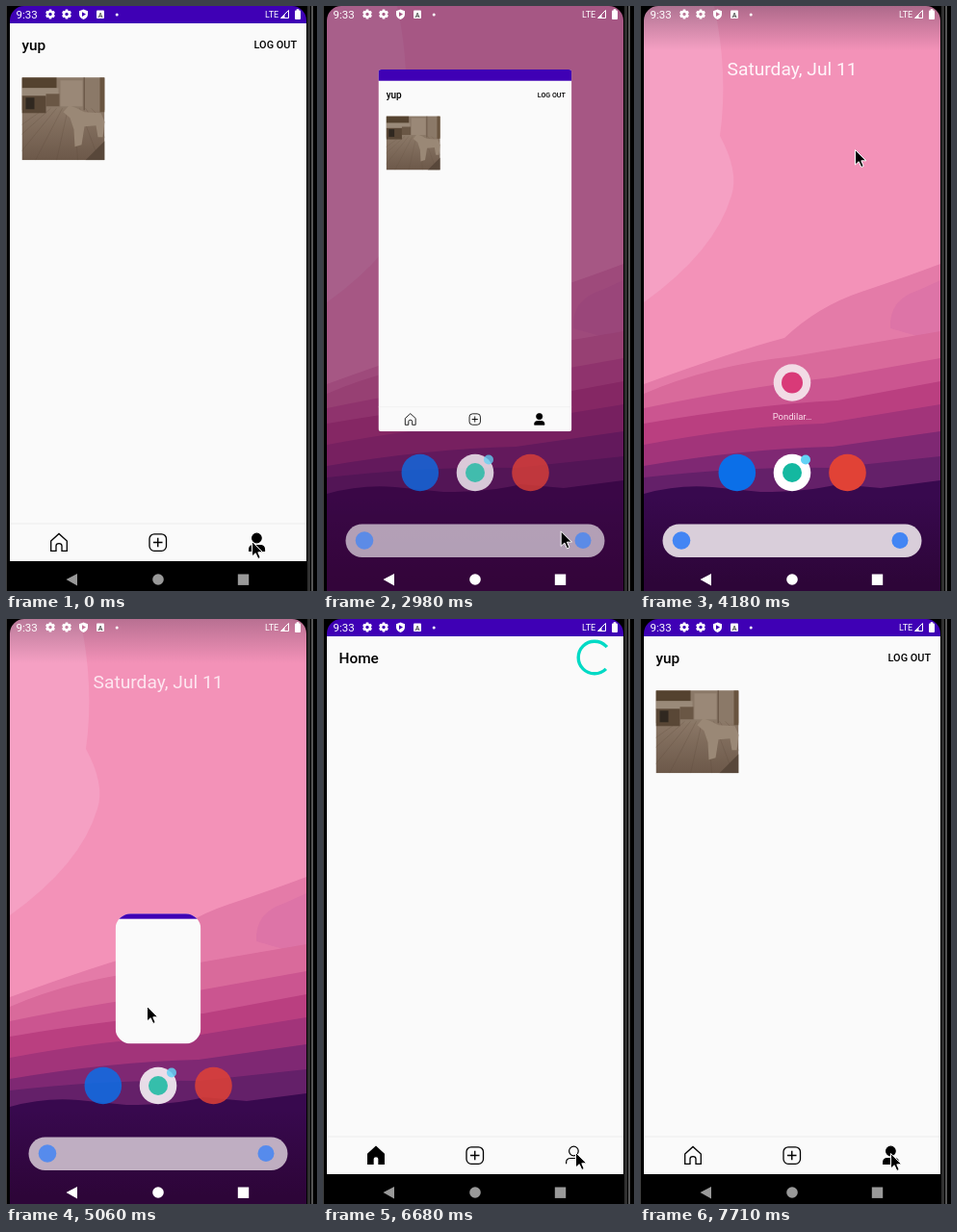
An HTML page with a canvas that plays this animation: 323 by 608 pixels, repeating every 8 s.

```html
<!DOCTYPE html>
<html lang="en">
<head>
<meta charset="utf-8">
<title>Phone screen</title>
<style>
html, body { margin: 0; width: 100%; height: 100%; overflow: hidden; background: #000; }
canvas { display: block; width: 323px; height: 608px; }
</style>
</head>
<body>
<canvas id="stage" width="323" height="608"></canvas>
<script>
const ctx = document.getElementById('stage').getContext('2d');
const LOOP = 8000;
const APP_LEAVES = 2640, APP_OPENS = 5030, APP_FULL = 5510;
const NAV_SHOWN = 5960, HOME_SHOWN = 6240, PROFILE_SHOWN = 7410;

// time, x, y of the pointer tip
const pointerPath = [
  [0, 255, 556], [150, 255, 556], [600, 41, 74], [900, 41, 74], [1150, 33, 44],
  [1340, 32, 50], [1640, 32, 50], [2060, 252, 591], [2750, 252, 591],
  [3560, 225, 360], [3680, 226, 340], [3880, 235, 65], [4180, 223, 149],
  [4770, 146, 402], [5800, 146, 402], [6400, 250, 583], [6650, 262, 554],
  [7270, 262, 554], [7410, 260, 555], [8000, 260, 555]
];

const ramp = (t, from, to) => Math.min(1, Math.max(0, (t - from) / (to - from)));
const mix = (a, b, p) => a + (b - a) * p;
const easeOut = p => 1 - (1 - p) ** 3;
const smooth = p => p * p * (3 - 2 * p);

function rect(x, y, w, h, color) {
  ctx.fillStyle = color;
  ctx.fillRect(x, y, w, h);
}

function round(x, y, w, h, r, color) {
  ctx.fillStyle = color;
  ctx.beginPath();
  ctx.roundRect(x, y, w, h, r);
  ctx.fill();
}

function disc(x, y, r, color) {
  ctx.fillStyle = color;
  ctx.beginPath();
  ctx.arc(x, y, r, 0, 7);
  ctx.fill();
}

function shape(d, fill, stroke, width = 1.3) {
  const path = new Path2D(d);
  if (fill) { ctx.fillStyle = fill; ctx.fill(path); }
  if (stroke) { ctx.strokeStyle = stroke; ctx.lineWidth = width; ctx.stroke(path); }
}

function label(text, x, y, size, color, weight = 400, align = 'left') {
  ctx.font = `${weight} ${size}px Roboto, sans-serif`;
  ctx.textAlign = align;
  ctx.fillStyle = color;
  ctx.fillText(text, x, y);
}

function scoped(draw) {
  ctx.save();
  draw();
  ctx.restore();
}

function gear(x, y) {
  scoped(() => {
    ctx.translate(x, y);
    ctx.fillStyle = ctx.strokeStyle = '#fff';
    for (let i = 0; i < 6; i++) {
      ctx.rotate(Math.PI / 3);
      ctx.fillRect(-1.3, -5, 2.6, 3);
    }
    ctx.lineWidth = 2.2;
    ctx.beginPath();
    ctx.arc(0, 0, 2.8, 0, 7);
    ctx.stroke();
  });
}

function statusIcons() {
  label('9:33', 10.5, 13, 11.5, '#fff');
  gear(46, 8.5);
  gear(63, 8.5);
  shape('M80.5 3.5 85 5.2V8.5Q85 12 80.5 14 76 12 76 8.5V5.2ZM79 6.2V11L83 8.6Z', '#fff');
  round(94, 4.5, 8, 8.5, 1, '#fff');
  label('A', 98, 11.5, 7, '#555', 700, 'center');
  disc(115.2, 9, 1.5, '#fff');
  label('LTE', 269, 12, 9, '#fff');
  shape('M285.5 12.5 293.5 4.5V12.5Z', null, '#fff', 1);
  shape('M285.5 12.5 289.5 8.5V12.5Z', '#fff');
  round(300, 4.5, 6, 9.5, 1, '#fff');
  rect(301.7, 3.2, 2.6, 2, '#fff');
}

function systemButtons(color) {
  shape('M62.5 596 74 590V602.5Z', color);
  disc(158, 596, 5.8, color);
  rect(240.8, 590.5, 11.4, 11.4, color);
}

function photo() {
  scoped(() => {
    ctx.translate(16.5, 74.3);
    ctx.beginPath();
    ctx.rect(0, 0, 86, 86);
    ctx.clip();
    const floor = ctx.createLinearGradient(0, 25, 0, 86);
    floor.addColorStop(0, '#8f7c6b');
    floor.addColorStop(1, '#6c5849');
    rect(0, 0, 86, 86, floor);
    rect(0, 0, 86, 34, '#8b7968');
    rect(0, 0, 36, 11, '#54422f');
    rect(0, 11, 38, 9, '#9a8a79');
    rect(0, 19, 25, 18, '#594736');
    rect(4, 21, 9, 12, '#302820');
    rect(25, 17, 14, 13, '#6a5745');
    rect(40, 3, 23, 27, '#9a8877');
    rect(64, 0, 1.5, 34, '#6d5a4a');
    rect(81, 0, 5, 36, '#69543f');
    for (let i = 0; i < 9; i++) shape(`M${24 + i * 6} 32 ${i * 22 - 52} 86`, null, '#5d4a3b55', 0.8);
    shape('M43 36 49 29 57 32 65 36 82 37 86 46 84 62 79 62 77 50 65 51 62 70 55 72 54 54 50 42Z', '#9a8876');
    shape('M86 66 66 86H86Z', '#58473a');
  });
}

function personIcon(filled) {
  const ink = filled ? '#000' : null;
  shape('M265.2 553A4.8 4.8 0 1 1 255.6 553 4.8 4.8 0 1 1 265.2 553Z', ink, '#000', 1.2);
  shape('M252.6 566.3V565Q252.6 560.5 257 560.5H264Q268.5 560.5 268.5 565V566.3' + (filled ? 'Z' : ''),
    ink, '#000', 1.2);
}

function tabs(page) {
  rect(4, 537.5, 308, 1, '#eeeeee');
  const home = page === 'home';
  shape('M46.7 556 55 548.5 63.3 556V566.4H58V561Q58 558.6 55 558.6T52 561V566.4H46.7Z',
    home ? '#000' : null, '#000', 1.3);
  ctx.beginPath();
  ctx.roundRect(149, 548.8, 17.5, 17.5, 5);
  ctx.stroke();
  shape('M153 557.5H162.5M157.75 552.8V562.2', null, '#000', 1.4);
  personIcon(page === 'profile');
}

function spinner(t) {
  const phase = (t - 6680) / 1333 * Math.PI * 2;
  const sweep = mix(0.4, 4.8, (1 + Math.cos(phase)) / 2);
  const start = 0.78 + phase * 0.9;
  ctx.strokeStyle = '#03dac5';
  ctx.lineWidth = 3.4;
  ctx.beginPath();
  ctx.arc(282, 40, 16.8, start, start + sweep);
  ctx.stroke();
}

function appPage(page, t) {
  rect(4, 0, 308, 577, '#fafafa');
  rect(4, 0, 308, 18, '#3f00b5');
  if (page === 'blank') return;
  tabs(page);
  if (page === 'profile') {
    label('yup', 16.5, 46, 15.4, '#000', 500);
    label('LOG OUT', 302, 44.3, 10.9, '#000', 500, 'right');
    photo();
  } else if (t >= HOME_SHOWN) {
    label('Home', 16.5, 46, 15.4, '#000', 500);
    spinner(t);
  }
}

function wallpaper() {
  rect(4, 0, 308, 608, '#f392b8');
  shape('M4 0H77Q92 70 83 135 103 172 95 197 78 255 4 308Z', '#f5a0c3');
  shape('M4 393Q100 358 150 345 185 312 230 297T312 268V608H4Z', '#e47ba8');
  shape('M260 335Q258 305 290 295L312 285V350Z', '#dd74a7');
  shape('M4 403Q70 374 160 364L312 338V608H4Z', '#d96a9b');
  shape('M4 418Q110 396 200 386L312 366V608H4Z', '#cb5590');
  shape('M4 434Q120 414 205 410L312 390V608H4Z', '#ba3f80');
  shape('M4 456Q110 436 190 434L312 414V608H4Z', '#a2347a');
  shape('M4 478Q110 460 200 458L312 442V608H4Z', '#7f2873');
  shape('M4 490Q110 478 200 480L312 468V608H4Z', '#642069');
  shape('M4 507Q40 497 75 500L125 505Q175 505 205 497L250 501 312 493V608H4Z', '#38094e');
  const shade = ctx.createLinearGradient(0, 510, 0, 600);
  shade.addColorStop(0, '#2d053800');
  shade.addColorStop(1, '#2d0538');
  rect(4, 510, 308, 98, shade);
}

function dock() {
  disc(100.8, 485, 19.3, '#0b6fe8');
  disc(158, 485, 19.3, '#fff');
  disc(158, 485, 10, '#14b8a0');
  disc(172, 471.5, 5, '#62d2f5');
  disc(215.5, 485, 19.3, '#e14236');
  round(23.5, 538.5, 269, 34.5, 17.2, '#d9ceda');
  disc(43, 555.5, 9.3, '#4285f4');
  disc(270, 555.5, 8.5, '#4285f4');
}

function homeItems() {
  const top = ctx.createLinearGradient(0, 0, 0, 46);
  top.addColorStop(0, 'rgba(60,40,65,.38)');
  top.addColorStop(1, 'rgba(60,40,65,0)');
  rect(4, 0, 308, 46, top);
  label('Saturday, Jul 11', 158, 72, 19.2, '#fff5fa', 400, 'center');
  disc(158, 391.5, 19.3, '#f2dbe5');
  disc(158, 391.5, 11, '#d93a78');
  label('Pondilar…', 158, 429.5, 9.5, '#fbdfeb', 400, 'center');
}

function recentsCard(t) {
  const shrink = easeOut(ramp(t, APP_LEAVES, 3000));
  const swipe = ramp(t, 3680, 3880) ** 1.3 + ramp(t, 3890, 3960) * 0.4;
  if (swipe >= 1.4) return;
  const scale = mix(1, 0.652, shrink);
  scoped(() => {
    ctx.globalAlpha = Math.max(0, 1 - 0.74 * swipe);
    ctx.translate(mix(4, 57.5, shrink), mix(0, 66, shrink) - 394 * swipe);
    ctx.scale(scale, scale);
    ctx.translate(-4, 0);
    ctx.beginPath();
    ctx.roundRect(4, 0, 308, 577, 5 * shrink);
    ctx.clip();
    appPage('profile', t);
  });
}

function openingWindow(t) {
  const p = easeOut(ramp(t, APP_OPENS, APP_FULL));
  if (p === 0) return;
  const rise = easeOut(ramp(t, APP_OPENS, APP_FULL + 20));
  const x = mix(138, 4, p), y = mix(371, 0, rise);
  const w = mix(40, 308, p), h = mix(410, 583, p) - y;
  scoped(() => {
    ctx.beginPath();
    ctx.roundRect(x, y, w, h, 20 * (1 - ramp(p, 0, 0.9)));
    ctx.clip();
    rect(x, y, w, h, '#fafafa');
    rect(x, y, w, 19 * w / 308, '#3f00b5');
  });
  if (p > 0.8) rect(4, 578, 308, 30, '#000');
}

function launcher(t) {
  wallpaper();
  const overview = ramp(t, APP_LEAVES, 2950) * (1 - ramp(t, 3900, 4130));
  rect(4, 0, 308, 608, `rgba(60,5,60,${0.42 * overview})`);
  const leaving = 1 - ramp(t, APP_OPENS, 5230);
  scoped(() => {
    ctx.globalAlpha = ramp(t, 2750, 3050) * leaving;
    dock();
    ctx.globalAlpha = ramp(t, 3930, 4180) * leaving;
    homeItems();
  });
  recentsCard(t);
  openingWindow(t);
  systemButtons('#fff');
}

function bezel() {
  ctx.fillStyle = '#000';
  ctx.beginPath();
  ctx.rect(0, 0, 323, 608);
  ctx.roundRect(4, 0, 308, 640, 15);
  ctx.fill('evenodd');
  rect(0, 0, 1, 608, '#3c3c3c');
  rect(313, 0, 3, 608, '#303030');
  rect(317, 0, 2, 608, '#555');
}

function pointer(t) {
  const next = pointerPath.findIndex(key => key[0] > t);
  const [t0, x0, y0] = pointerPath[next - 1];
  const [t1, x1, y1] = pointerPath[next];
  const p = smooth(ramp(t, t0, t1));
  scoped(() => {
    ctx.translate(mix(x0, x1, p), mix(y0, y1, p));
    shape('M.5 .5V16L4.2 12.7 6.8 18.5 9.2 17.4 6.8 11.8H11.8Z', '#000', '#fff', 1);
  });
}

function render(now) {
  const t = now % LOOP;
  rect(0, 0, 323, 608, '#000');
  if (t < APP_LEAVES || t >= APP_FULL) {
    let page = 'profile';
    if (t >= APP_FULL && t < NAV_SHOWN) page = 'blank';
    else if (t >= NAV_SHOWN && t < PROFILE_SHOWN) page = 'home';
    appPage(page, t);
    systemButtons('#999');
  } else {
    launcher(t);
  }
  statusIcons();
  bezel();
  pointer(t);
}

const began = performance.now();
function tick() {
  render(performance.now() - began);
  requestAnimationFrame(tick);
}
tick();
</script>
</body>
</html>
```
